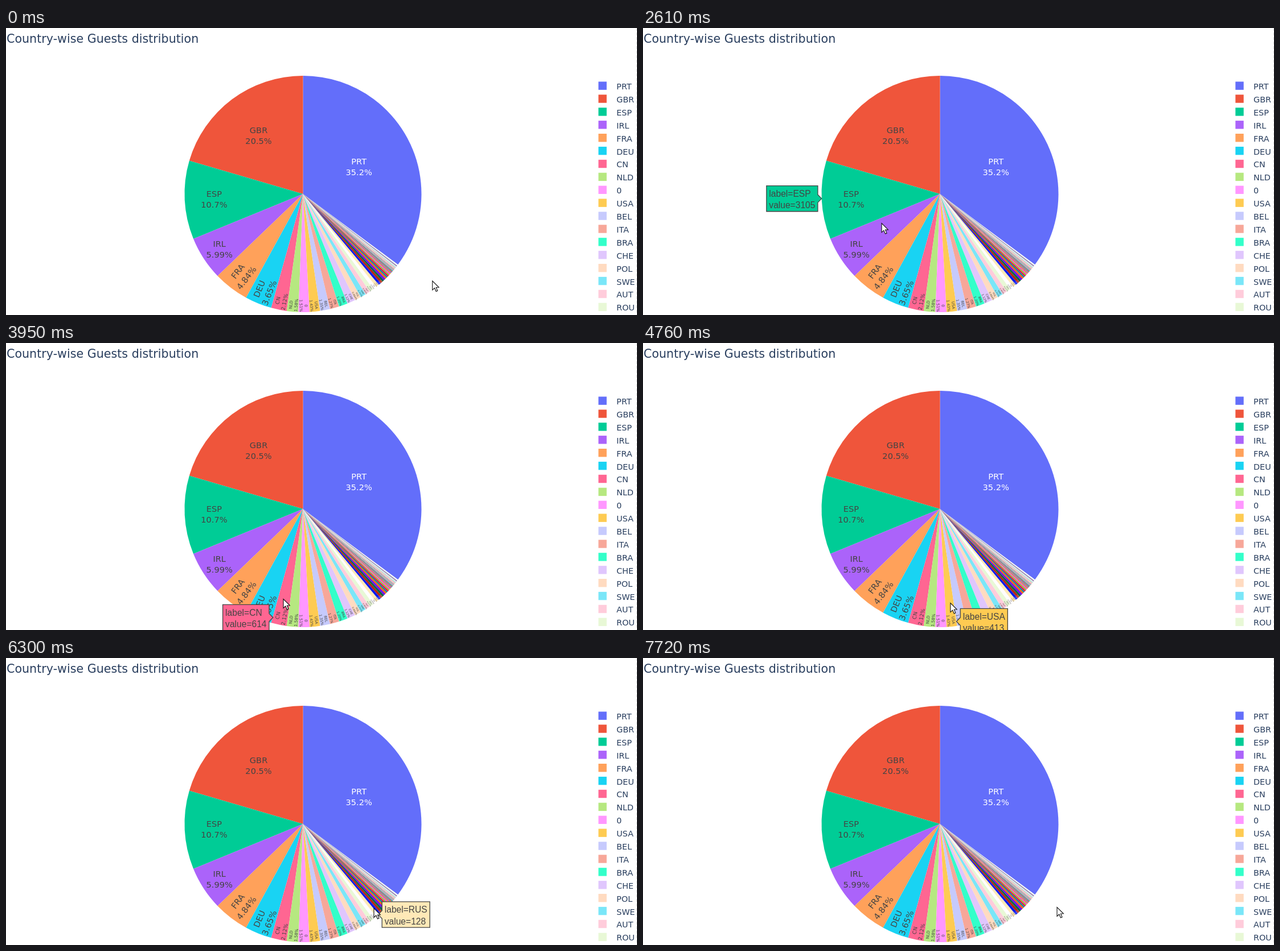
An HTML page with a canvas that plays this animation: 1108x505 px, repeating every 7.79 s.

```html
<!DOCTYPE html>
<html lang="en">
<head>
<meta charset="utf-8">
<title>Guests by country</title>
<style>
  html, body { margin: 0; width: 100%; height: 100%; overflow: hidden; background: #fff; }
  canvas { display: block; }
</style>
</head>
<body>
<canvas id="stage" width="1108" height="505"></canvas>
<script>
const ctx = document.getElementById('stage').getContext('2d');
const LOOP = 7790, HOVER_LAG = 90;
const CX = 521.5, CY = 292, R = 208, TAU = Math.PI * 2;
const LABEL_SIZE = 14.6, LABEL_ASPECT = 1.28, HOVER_SIZE = 15.6;
const CHART_FONT = '"DejaVu Sans", Verdana, sans-serif';
const HOVER_FONT = '"Liberation Sans", Arial, sans-serif';
const TITLE_INK = '#2a3f5f';

const PALETTE = '636efa EF553B 00cc96 ab63fa FFA15A 19d3f3 FF6692 B6E880 FF97FF FECB52'.split(' ');
const LIGHTNESS_SHIFT = [0, 0.2, -0.2];
const LEGEND_ROWS = 18;
const LABELS = ('PRT GBR ESP IRL FRA DEU CN NLD 0 USA BEL ITA BRA CHE POL SWE AUT ROU FIN RUS ' +
  'CHN NOR AUS DNK LUX ARG LTU HUN MAR LVA EST CZE IND UKR ZAF TUR ISR JPN COL NZL').split(' ');

// Leading countries, an even descent, then two geometric tails.
const series = (count, rule) => Array.from({ length: count }, (_, k) => Math.max(1, Math.round(rule(k))));
const VALUES = [
  10184, 5922, 3105, 1734, 1400, 1057, 614,
  ...series(7, k => 458 - 22.5 * k),
  ...series(6, k => 250 * 0.8746 ** k),
  ...series(90, k => 100 * 0.905 ** k)
];
const TOTAL = VALUES.reduce((sum, v) => sum + v, 0);

// Pointer path: time, x, y.
const PATH = [
  [0, 749, 445], [340, 676, 290], [430, 676, 290], [1230, 485, 222], [1500, 460, 227],
  [2030, 428, 276], [2610, 419, 343], [3610, 466, 438], [3950, 487, 450], [4420, 512, 458],
  [5510, 601, 455], [6300, 646, 440], [7250, 678, 413], [7720, 727, 438]
];
const POINTER = new Path2D('M0 .5V16.5L3.8 13 6.4 19 9 18 6.5 12 11.3 11.8Z');

// Moves HSL lightness while keeping hue and saturation.
function shade(hex, shift) {
  const rgb = [0, 2, 4].map(i => parseInt(hex.slice(i, i + 2), 16) / 255);
  const light = (Math.max(...rgb) + Math.min(...rgb)) / 2;
  const shifted = Math.min(1, light + shift);
  const chroma = (1 - Math.abs(2 * shifted - 1)) / (1 - Math.abs(2 * light - 1));
  return rgb.map(c => Math.round(255 * (shifted + (c - light) * chroma)));
}

function onRay(a, distance) {
  return [CX - Math.sin(a) * distance, CY - Math.cos(a) * distance];
}

// Angles run counterclockwise from the top; the first slice ends there.
const FIRST_ANGLE = -VALUES[0] / TOTAL * TAU;
let angle = FIRST_ANGLE;
const slices = VALUES.map((value, i) => {
  const start = angle, sweep = value / TOTAL * TAU;
  angle += sweep;
  const mid = start + sweep / 2;
  const sinHalf = Math.sin(sweep / 2);
  const inscribed = sinHalf / (1 + sinHalf);
  const [r, g, b] = shade(PALETTE[i % 10], LIGHTNESS_SHIFT[Math.floor(i / 10) % 3]);
  return {
    label: LABELS[i < LABELS.length ? i : 20 + i % 20],
    value, start, mid, inscribed,
    end: angle,
    halfSweep: sweep / 2,
    color: `rgb(${r}, ${g}, ${b})`,
    ink: 0.299 * r + 0.587 * g + 0.114 * b < 128 ? '#fff' : '#444',
    center: onRay(mid, R * (1 - inscribed))
  };
});

function pointerAt(time) {
  const t = Math.max(0, Math.min(time, PATH.at(-1)[0]));
  const next = Math.max(1, PATH.findIndex(p => p[0] >= t));
  const [t0, x0, y0] = PATH[next - 1], [t1, x1, y1] = PATH[next];
  const u = (t - t0) / (t1 - t0);
  return [x0 + (x1 - x0) * u, y0 + (y1 - y0) * u];
}

function sliceAt([x, y]) {
  const dx = x - CX, dy = y - CY;
  if (Math.hypot(dx, dy) > R) return null;
  let a = Math.atan2(-dx, -dy);
  if (a < FIRST_ANGLE) a += TAU;
  return slices.find(s => a >= s.start && a < s.end);
}

function text(str, x, y, size, family, color, align = 'left') {
  ctx.font = `${size}px ${family}`;
  ctx.fillStyle = color;
  ctx.textAlign = align;
  ctx.fillText(str, x, y + 0.45 * size);
}

function drawSlice(s) {
  ctx.beginPath();
  ctx.moveTo(CX, CY);
  ctx.arc(CX, CY, R, -Math.PI / 2 - s.start, -Math.PI / 2 - s.end, true);
  ctx.fillStyle = s.color;
  ctx.fill();
}

// Wide slices hold level text; narrow ones turn and shrink it to fit the rim.
function drawSliceLabel(s) {
  const q = LABEL_ASPECT + 1 / (2 * Math.tan(s.halfSweep));
  const fit = 1 / (Math.sqrt(q * q + 0.5) + q);
  const size = LABEL_SIZE * Math.min(1, fit * R / 18.7);
  ctx.save();
  if (s.inscribed > 0.14) {
    ctx.translate(...s.center);
  } else {
    const theta = -Math.PI / 2 - s.mid;
    ctx.translate(...onRay(s.mid, R * (Math.cos(fit) - LABEL_ASPECT * fit)));
    ctx.rotate(Math.cos(theta) < 0 ? theta + Math.PI : theta);
  }
  const percent = (s.value / TOTAL * 100).toPrecision(3) + '%';
  text(s.label, 0, -0.65 * size, size, CHART_FONT, s.ink, 'center');
  text(percent, 0, 0.65 * size, size, CHART_FONT, s.ink, 'center');
  ctx.restore();
}

function drawLegendRow(s, i) {
  const y = 101.6 + 22.9 * i;
  ctx.fillStyle = s.color;
  ctx.fillRect(1040.3, y - 7.2, 14.4, 14.4);
  text(s.label, 1072, y, 14.4, CHART_FONT, TITLE_INK);
}

function paint(path, fill, stroke, width) {
  ctx.fillStyle = fill;
  ctx.strokeStyle = stroke;
  ctx.lineWidth = width;
  ctx.fill(path);
  ctx.stroke(path);
}

function drawTooltip(s) {
  const lines = [`label=${s.label}`, `value=${s.value}`];
  ctx.font = `${HOVER_SIZE}px ${HOVER_FONT}`;
  const width = Math.max(...lines.map(l => ctx.measureText(l).width)) + 9;
  const side = Math.sin(s.mid) > 0 ? -1 : 1;
  const tip = s.center[0] + side * s.inscribed * R, y = s.center[1];
  const near = tip + side * 6.8, far = near + side * width;
  const box = new Path2D(
    `M${tip} ${y}L${near} ${y + 7}V${y + 22.6}H${far}V${y - 22.6}H${near}V${y - 7}Z`);
  paint(box, s.color, s.ink, 1.3);
  const left = Math.min(near, far) + 4.5;
  lines.forEach((line, i) => text(line, left, y - 10 + 20.3 * i, HOVER_SIZE, HOVER_FONT, s.ink));
}

function drawPointer([x, y]) {
  ctx.save();
  ctx.translate(x, y);
  paint(POINTER, '#fff', '#111', 1.1);
  ctx.restore();
}

function drawRightEdge() {
  ctx.fillStyle = '#dcdcdc';
  for (let y = 0; y < 505; y += 8) ctx.fillRect(1107, y, 1, 5);
}

function draw(now) {
  const t = now % LOOP;
  ctx.fillStyle = '#fff';
  ctx.fillRect(0, 0, 1108, 505);
  text('Country-wise Guests distribution', 1, 17, 20.65, CHART_FONT, TITLE_INK);
  slices.forEach(drawSlice);
  slices.slice(0, 22).forEach(drawSliceLabel);
  slices.slice(0, LEGEND_ROWS).forEach(drawLegendRow);
  drawRightEdge();
  const hovered = sliceAt(pointerAt(t - HOVER_LAG));
  if (hovered) drawTooltip(hovered);
  drawPointer(pointerAt(t));
  requestAnimationFrame(() => draw(performance.now() - begin));
}

const begin = performance.now();
draw(0);
</script>
</body>
</html>
```
